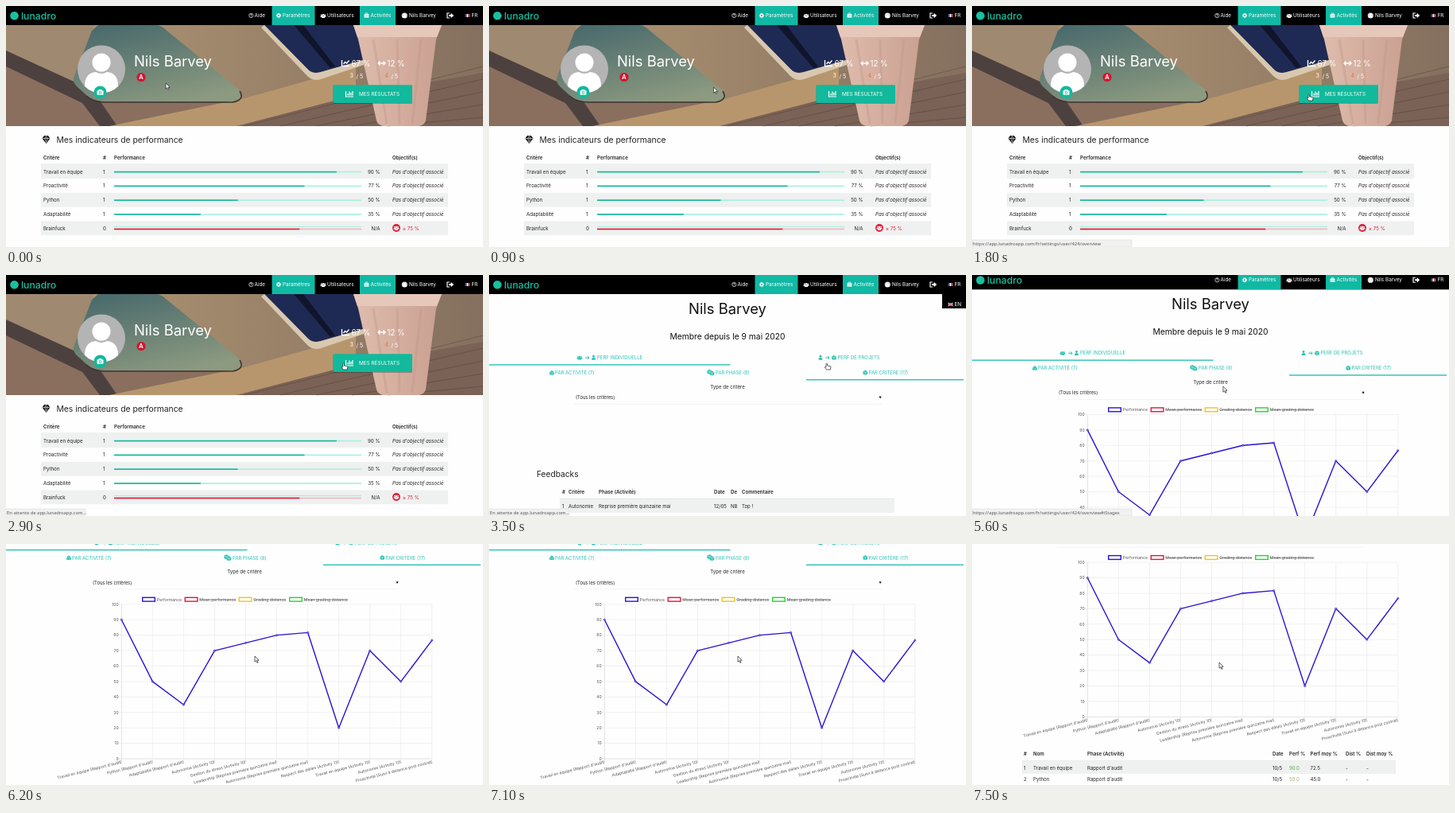
These frames come from a looping animation (600 px wide and 303 px high, 7600 ms). An HTML page:

```html
<!DOCTYPE html>
<html lang="fr">
<head>
<meta charset="utf-8">
<title>Indicateurs de performance</title>
<style>
html, body { margin: 0; width: 100%; height: 100%; overflow: hidden; background: #fefefe; }
svg { display: block; width: 600px; height: 303px; }
text { font-family: Inter, "Open Sans", sans-serif; white-space: pre; }
#status text { font-family: "Noto Sans", sans-serif; }
</style>
</head>
<body>
<svg id="stage" viewBox="0 0 600 303"></svg>
<script>
const TEAL = '#12b99c', NAV = '#11b8a4', TAB = '#2bc2b3', INK = '#222', RED = '#dc2038', GREY = '#eff0f0';
const USER = 'Nils Barvey', BRAND = 'lunadro', HOST = `app.${BRAND}app.com`;
const LOOP = 7600;

const rect = (x, y, w, h, fill, more = '') =>
  `<rect x="${x}" y="${y}" width="${w}" height="${h}" fill="${fill}" ${more}/>`;
const circle = (x, y, r, fill, more = '') => `<circle cx="${x}" cy="${y}" r="${r}" fill="${fill}" ${more}/>`;
const path = (d, fill, more = '') => `<path d="${d}" fill="${fill}" ${more}/>`;
const line = (d, color, width, more = '') =>
  path(d, 'none', `stroke="${color}" stroke-width="${width}" ${more}`);
const text = (x, y, s, size, fill = INK, more = '') =>
  `<text x="${x}" y="${y}" font-size="${size}" fill="${fill}" ${more}>${s}</text>`;
const group = (id, body, more = '') => `<g id="${id}" ${more}>${body}</g>`;
const at = (x, y, body, k = 1) => `<g transform="translate(${x} ${y}) scale(${k})">${body}</g>`;
const BOLD = 'font-weight="600"', MID = 'text-anchor="middle"', END = 'text-anchor="end"';

// Icons, centred on the given point
const person = (x, y, c, k = 1) =>
  at(x, y, circle(0, -1.7, 1.6, c) + path('M-2.6 3.2V2Q-2.6 .2-.8 .2H.8Q2.6 .2 2.6 2V3.2Z', c), k);
const people = (x, y, c) =>
  person(x - 2.1, y - .3, c, .55) + person(x + 2.1, y - .3, c, .55) + person(x, y + .2, c, .75);
const arrow = (x, y, c) => line(`M${x - 2.5} ${y}h5m-2-2l2 2l-2 2`, c, 1);
const cube = (x, y, c) => path(`M${x} ${y - 3}l2.8 1.3v3.4l-2.8 1.3l-2.8-1.3v-3.4Z`, c) +
  line(`M${x - 2.4} ${y - 1.4}l2.4 1.1l2.4-1.1M${x} ${y - .3}v2.8`, '#fff', .5);
const cubes = (x, y, c) => at(x, y, cube(0, -1.3, c) + cube(-1.8, 1.5, c) + cube(1.8, 1.5, c), .65);
const graph = (x, y) => line(`M${x - 4.5} ${y - 3.5}v7h9.5`, '#fff', 1.2) +
  line(`M${x - 2} ${y + 2}v-2.5m2 2.5v-5m2 5v-3.5m2 3.5v-5.5`, '#fff', 1.2);
const flag = (x, y, colors) => colors.map((c, i) => rect(x + i * 2, y, 2, 4, c)).join('');
const britain = (x, y) => rect(x, y, 6, 4, '#3a4a86') +
  line(`M${x} ${y}l6 4m0-4l-6 4M${x} ${y + 2}h6M${x + 3} ${y}v4`, '#eee', .9) +
  line(`M${x} ${y + 2}h6M${x + 3} ${y}v4`, '#d23', .6);

function navbar() {
  const item = (x, s) => text(x, 14.2, s, 6.35, '#fff');
  return rect(0, 0, 600, 24, '#000') + rect(334.5, 0, 54, 24, NAV) + rect(445, 0, 45, 24, NAV) +
    circle(10.5, 12.3, 5.3, '#19c0a2') + text(19, 16.5, BRAND, 12.2, '#19c0a2', 'font-weight="500"') +
    circle(308.3, 12, 2.6, 'none', 'stroke="#fff" stroke-width=".7"') + text(308.3, 13.7, '?', 4.6, '#fff', MID + ' ' + BOLD) +
    item(312.5, 'Aide') +
    circle(343, 12, 1.8, 'none', 'stroke="#fff" stroke-width="1.4"') +
    circle(343, 12, 2.7, 'none', 'stroke="#fff" stroke-width=".8" stroke-dasharray="1.1 1"') +
    item(348, 'Paramètres') + people(399, 12.3, '#fff') + item(404, 'Utilisateurs') +
    rect(450.5, 10.2, 6, 4.4, '#fff', 'rx=".6"') + line('M452.2 10V9h2.6v1', '#fff', .7) +
    line('M450.5 12.5h6', NAV, .5) + item(458.5, 'Activités') +
    circle(501.3, 12, 3.6, '#ddd') + person(501.3, 12.2, '#fff', .85) + item(507, USER) +
    line('M558 9h-3v6h3', '#fff', 1.2) + path('M557 11h2.6V8.8l3.6 3.2l-3.6 3.2V13H557Z', '#fff') +
    flag(577.5, 10, ['#3555a0', '#fff', '#e04050']) + item(585.5, 'FR');
}

// Desk with a laptop, a notebook and a cup, in flat shapes
function photo() {
  const grain = [0, 1, 2, 3, 4].map(i =>
    line(`M${300 + i * 45} 151L600 ${76 + i * 16}`, '#4a3a33', 1.2, 'opacity=".4"')).join('');
  return rect(0, 24, 600, 127, 'url(#wood)') +
    path('M0 24H110L92 98L0 56Z', '#9f8970') +
    path('M0 56L100 104L124 119H290L250 151H0Z', '#8a6f5f') +
    path('M0 56L92 98L118 119L140 151H118L96 122L0 76Z', '#4d4140') +
    path('M130 151L300 116L386 92L440 76V118L290 151Z', '#b8966d') +
    path('M290 151L440 112L600 84V151Z', '#7b6256') + grain +
    path('M116 24H190Q196 25 201 30L293 105Q301 117 285 120H124Q110 120 101 112L89 101Q83 95 86 88L108 31Z', 'url(#metal)') +
    line('M101 113Q110 121 124 121H285Q301 118 294 107', '#3d3735', 1.6) +
    path('M325 24H442L456 66L396 83Q386 86 380 80Z', '#1f2a54') +
    path('M325 24L380 80Q386 86 396 83L456 66V72L396 92Q386 95 379 88L321 27Z', '#d8c8b0') +
    path('M362 24L408 78L414 76L374 24Z', '#10152c') +
    path('M437 24H548L541 42L528 144Q527 149 520 151H474Q467 149 466 144L443 42Z', 'url(#cup)') +
    path('M437 24H548L542 39H442Z', '#e6c8ba') +
    line('M462 42L479 148M492 42L495 148M522 42L511 148', '#bd9284', 3, 'opacity=".35"');
}

function hero() {
  const stat = (x, a, c, b) => text(x, 90.2, a, 7, c) + text(x + 8, 90.5, b, 7, '#fff');
  return photo() +
    circle(120, 79.5, 30, '#b4b4b4') + circle(120, 71, 11.5, '#fff') +
    path('M99 101Q99 84 113 83Q120 87 127 83Q141 84 141 101A30 30 0 0 1 99 101Z', '#fff') +
    circle(118.5, 108.5, 8, TEAL) + rect(114.5, 106.2, 8, 5.6, '#fff', 'rx="1"') +
    rect(116.5, 105, 4, 2, '#fff') + circle(118.5, 109, 1.8, TEAL) + circle(118.5, 109, 1, '#fff') +
    text(161, 76, USER, 18.4, '#fff') +
    circle(170, 89.5, 5.6, '#d5142c') + text(170, 92.4, 'A', 8, '#fff', MID + ' ' + BOLD) +
    line('M422.5 68v7.5h9.5M424.5 73l2-2.5l2 1.5l3-3.5', '#fff', 1.4) + text(434.5, 76.2, '67 %', 9.7, '#fff') +
    line('M468.5 72h8m-6-2.5l-2.5 2.5l2.5 2.5m4-5l2.5 2.5l-2.5 2.5', '#fff', 1.4) + text(479.5, 76.2, '12 %', 9.7, '#fff') +
    stat(432.5, '3', '#fff', '/ 5') + stat(476.5, '4', '#e8743a', '/ 5') +
    rect(411.5, 100, 99.5, 23, '#000', 'rx="1" opacity=".25"') + rect(411.5, 99.3, 99.5, 22.7, TEAL, 'rx="1"') +
    graph(432, 110.5) + text(444, 113, 'MES RÉSULTATS', 6.4, '#fff');
}

function indicators() {
  const rows = [['Travail en équipe', 90], ['Proactivité', 77], ['Python', 50], ['Adaptabilité', 35], ['Brainfuck']];
  const bar = (y, share, pale, c) => rect(136, y, 311, 1.6, pale) + rect(136, y, 311 * share, 1.6, c);
  const heads = [[47, 'Critère'], [122, '#'], [136, 'Performance'], [486, 'Objectif(s)']];
  const row = ([name, value], i) => {
    const y = 208.3 + 17.8 * i;
    return (i % 2 ? '' : rect(44, y - 9, 512, 17.8, GREY)) + text(47, y + 2.3, name, 6.15) +
      text(122, y + 2.3, value ? 1 : 0, 6.15) + text(470.5, y + 2.3, value ? value + ' %' : 'N/A', 6.15, INK, END) +
      (value
        ? bar(y - .5, value / 100, '#a6f0df', '#16b79b') +
          text(486, y + 2.3, "Pas d'objectif associé", 6.2, INK, 'font-style="italic"')
        : rect(136, y - 2.6, 311, 1.2, '#a6f0df') + bar(y + .2, .75, '#f3b3bd', RED) +
          circle(491, y - .5, 5, RED) + people(491, y - .4, '#fff') + text(499, y + 2, '≥ 75 %', 6.2, RED));
  };
  return path('M45.5 166.5L48 163h5l2.5 3.5L50.5 173Z', '#111') +
    line('M45.5 166.5h10M48.8 166.5l1.7 5l1.7-5l-1.7-3l-1.7 3', '#fff', .6) +
    text(63.5, 171.7, 'Mes indicateurs de performance', 10.35) +
    heads.map(([x, s]) => text(x, 192.8, s, 6.2, INK, BOLD)).join('') +
    rect(44, 198.6, 512, .7, '#d8dada') + rows.map(row).join('');
}

function overview() {
  const tab = (x, y, s) => text(x, y, s, 6, TAB);
  return text(300, 48.5, USER, 18.4, '#111', MID) +
    text(300, 80.6, 'Membre depuis le 9 mai 2020', 10.3, '#111', MID) +
    people(114, 104, TAB) + arrow(123.5, 104, TAB) + person(131.5, 103.8, TAB, .9) + tab(136, 106, 'PERF INDIVIDUELLE') +
    person(417, 103.8, TAB, .9) + arrow(425.5, 104, TAB) + cube(434, 104, TAB) + tab(438.5, 106, 'PERF DE PROJETS') +
    rect(0, 112.2, 303.5, 1.4, TAB) + rect(399, 131, 198, 1.4, TAB) +
    cubes(79, 122.7, TAB) + tab(83, 125, 'PAR ACTIVITÉ (7)') +
    cube(277.2, 121.7, TAB) + cube(280.5, 123.6, TAB) + tab(285, 125, 'PAR PHASE (8)') +
    cube(473.3, 122.7, TAB) + tab(477.5, 125, 'PAR CRITÈRE (17)') +
    text(300, 142.6, 'Type de critère', 6.1, INK, MID) + text(109, 156, '(Tous les critères)', 5.8) +
    path('M490.5 152.6h3.2l-1.6 2.8Z', '#111') + rect(107, 162, 387, .5, '#e9e9ee');
}

const cells = (y, xs, values, more = '', colors = []) =>
  values.map((s, i) => text(xs[i], y, s, 6.1, colors[i] || INK, more)).join('');

function feedbacks() {
  const xs = [92, 100, 138, 283, 304, 318];
  return text(60, 253.5, 'Feedbacks', 10.2) +
    cells(275.3, xs, ['#', 'Critère', 'Phase (Activité)', 'Date', 'De', 'Commentaire'], BOLD) +
    rect(89, 281, 421, .7, '#d8dada') + rect(89, 282, 421, 17, GREY) +
    cells(293.3, xs, ['1', 'Autonomie', 'Reprise première quinzaine mai', '12/05', 'NB', 'Top !']);
}

const X0 = 145.3, STEP = 39.05, BASE = 375.4, UNIT = 1.942;
const VALUES = [90, 50, 35, 70, 75, 80, 81.7, 20, 70, 50, 76.7];
const PHASES = ["Rapport d'audit", 'Activity 10', 'Reprise première quinzaine mai', 'Activity 13', 'Suivi à distance post contrat'];
const LABELS = [['Travail en équipe', 0], ['Python', 0], ['Adaptabilité', 0], ['Autonomie', 1], ['Gestion du stress', 1],
  ['Leadership', 2], ['Autonomie', 2], ['Respect des délais', 3], ['Travail en équipe', 3], ['Autonomie', 3], ['Proactivité', 4]];

function chart() {
  const legend = [[171, '#2a12d6', 'Performance'], [224.5, '#e0143c', 'Mean performance'],
    [292.5, '#f2c21c', 'Grading distance'], [356, '#25d32f', 'Mean grading distance']];
  const keys = legend.map(([x, c, s], i) => rect(x + .7, 172.7, 15.6, 4.8, '#fff', `stroke="${c}" stroke-width="1.4"`) +
    text(x + 18.8, 177, s, 5.1, '#555', i ? 'text-decoration="line-through"' : ''));
  const grid = VALUES.map((_, i) => {
    const y = BASE - i * 10 * UNIT, x = X0 + i * STEP, c = i ? '#e8e8e8' : '#cfcfcf', [name, phase] = LABELS[i];
    return line(`M${X0 - 4} ${y}H${X0 + 10 * STEP}M${x} ${BASE + 4}V${BASE - 100 * UNIT}`, c, .6) +
      text(X0 - 3.6, y + 1.8, i * 10, 5.1, '#555', END) +
      text(0, 0, `${name} (${PHASES[phase]})`, 5.1, '#555', `${END} transform="translate(${x + .6} ${BASE + 5.5}) rotate(-14)"`);
  });
  const xs = [65, 77, 145, 378, 399, 425.5, 470, 496];
  const row = (y, n, name, perf, color, mean) =>
    cells(y, xs, [n, name, "Rapport d'audit", '10/5', perf, mean, '-', '-'], '', ['', '', '', '', color]);
  return keys.join('') + grid.join('') + group('curve', '') +
    cells(423.8, xs, ['#', 'Nom', 'Phase (Activité)', 'Date', 'Perf %', 'Perf moy %', 'Dist %', 'Dist moy %'], BOLD) +
    rect(63, 430.6, 470, .7, '#d8dada') + rect(63, 431.4, 470, 15.6, GREY) +
    row(441.8, 1, 'Travail en équipe', '90.0', '#4fb04a', '72.5') + row(456.3, 2, 'Python', '50.0', '#a9ad78', '45.0');
}

const gradient = (id, a, b, more = '') => `<linearGradient id="${id}" ${more}>
  <stop stop-color="${a}"/><stop offset="1" stop-color="${b}"/></linearGradient>`;

stage.innerHTML = `<defs>${gradient('wood', '#b59a76', '#85705f')}
  ${gradient('metal', '#4a6a6c', '#8c9a80', 'x1=".2" y1="0" x2=".7" y2="1"')}${gradient('cup', '#dfbdae', '#c99f90')}</defs>` +
  group('page', group('profile', hero() + indicators()) +
    group('detail', overview() + group('notes', feedbacks()) + group('plot', chart())) + navbar() +
    group('menu', rect(570, 24, 30, 18, '#000') + britain(577.5, 35) + text(585.5, 39.2, 'EN', 6.35, '#fff'))) +
  group('status', rect(0, 294, 0, 9, '#f1f1f1', 'stroke="#d5d5d5" stroke-width=".5"') + text(1, 300.9, '', 5.85, '#555')) +
  group('pointer', path('M0 0V7.2L1.7 5.7L2.9 8.4L4.1 7.9L2.9 5.2H5.1Z', '#fff', 'stroke="#222" stroke-width=".7"')) +
  group('hand', path('M0 .6Q.8-.6 1.6 .6V3L5.4 3.6Q6 3.8 6 4.6L5.4 8H.6L-1.7 5Q-1.6 3.8 0 4.8Z', '#fff', 'stroke="#222" stroke-width=".7"'));

const $ = id => document.getElementById(id);
const show = (id, on) => $(id).setAttribute('display', on ? 'inline' : 'none');
const move = (id, x, y) => $(id).setAttribute('transform', `translate(${x} ${y})`);
const clamp = p => Math.min(1, Math.max(0, p));
const smooth = p => p < .5 ? 2 * p * p : 1 - 2 * (1 - p) ** 2;

// Pointer stops: time, x, y
const STOPS = [[0, 201, 97], [300, 201, 97], [1700, 423, 111], [3500, 424, 111], [4700, 411, 114.5],
  [4900, 411, 114.5], [5500, 316, 140], [6200, 313, 141], [7100, 313, 141], [7500, 311, 149], [LOOP, 311, 149]];
const WHEEL = [5530, 5830, 7130];

const URL_PATH = `https://${HOST}/fr/settings/user/424/overview`;
// Status line: start time, text, box width
const STATUS = [[0, '', 0], [1700, URL_PATH, 201], [2300, `En attente de ${HOST}…`, 100],
  [4200, URL_PATH + '#iCriteria', 201], [5000, URL_PATH + '#iStages', 201], [5700, '', 0]];

function pointerAt(t) {
  const i = STOPS.findIndex(s => s[0] > t), [t0, x0, y0] = STOPS[i - 1], [t1, x1, y1] = STOPS[i];
  const p = smooth((t - t0) / (t1 - t0));
  return [x0 + (x1 - x0) * p, y0 + (y1 - y0) * p];
}

function drawCurve(t) {
  const grow = 1 - (1 - clamp((t - 4000) / 700)) ** 4;
  const points = VALUES.map((v, i) => [X0 + i * STEP, BASE - v * UNIT * grow]);
  $('curve').innerHTML = line('M' + points.join('L'), '#2a12d6', 1.4, 'stroke-linejoin="round"') +
    points.map(([x, y]) => circle(x, y, 1.1, '#8e86ea', 'stroke="#2a12d6" stroke-width=".6"')).join('');
}

function draw(t) {
  const loaded = t >= 3300, charted = t >= 4100, hand = t >= 1700 && t < 5300;
  show('profile', !loaded);
  show('detail', loaded);
  show('menu', loaded && t < 3900);
  show('notes', !charted);
  show('plot', charted);
  if (charted) drawCurve(t);
  move('page', 0, -WHEEL.reduce((sum, t0) => sum + 52.7 * smooth(clamp((t - t0) / 300)), 0));

  const [, label, width] = STATUS.findLast(s => s[0] <= t);
  show('status', label);
  $('status').firstChild.setAttribute('width', width);
  $('status').lastChild.textContent = label;

  show('hand', hand);
  show('pointer', !hand);
  move(hand ? 'hand' : 'pointer', ...pointerAt(t));
}

// The picture advances in steps of 100 ms
const start = performance.now();
function tick() {
  draw(Math.floor((performance.now() - start) % LOOP / 100) * 100);
  requestAnimationFrame(tick);
}
tick();
</script>
</body>
</html>
```
